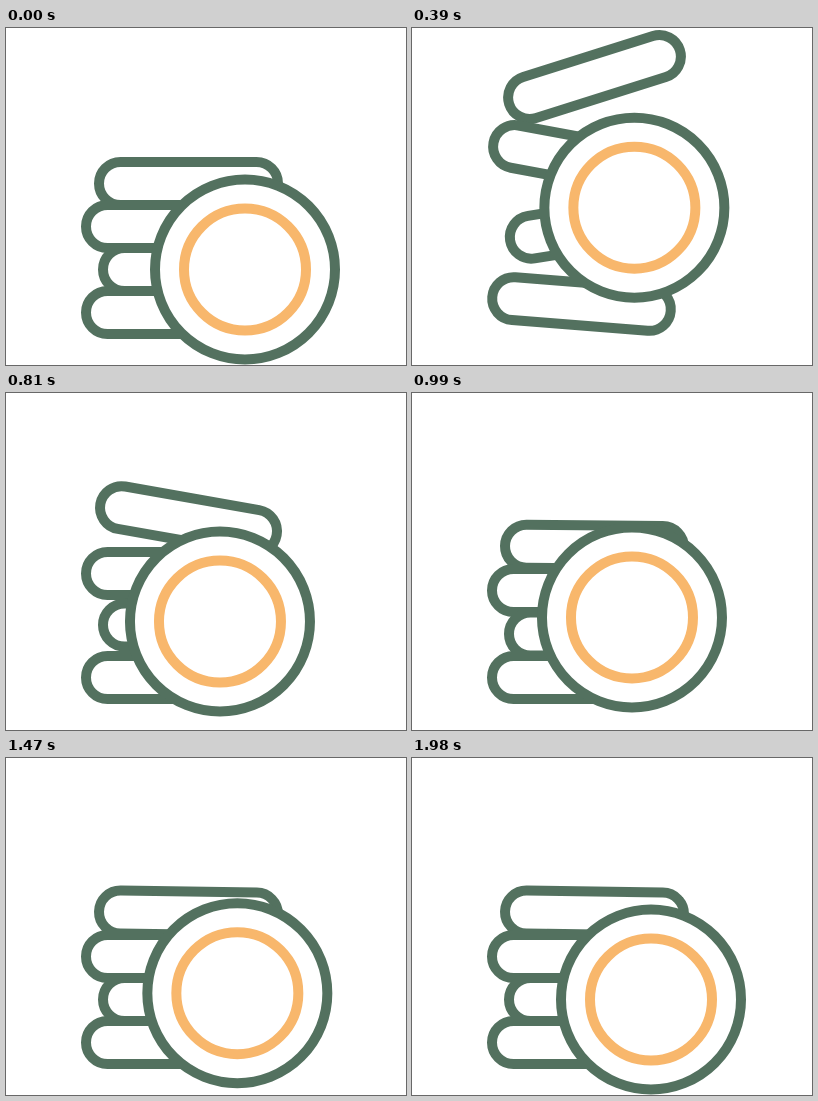
An HTML page that plays this animation: 400 by 337 pixels, repeating every 4.04 s.

```html
<!DOCTYPE html>
<html lang="en">
<head>
<meta charset="utf-8">
<title>Bouncing coin</title>
<style>
  html, body { margin: 0; width: 100%; height: 100%; overflow: hidden; background: #fff; }
  svg { display: block; width: 100%; height: 100%; }
  rect, circle { fill: none; stroke: #53715f; stroke-width: 10; }
  #coin circle:first-child { fill: #fff; }
  #coin circle:last-child { stroke: #f8b76c; }
</style>
</head>
<body>
<svg viewBox="0 0 400 337">
  <g id="bars"></g>
  <g id="coin"><circle r="90"/><circle r="61"/></g>
</svg>
<script>
const LOOP = 4040, STEP = 30, MOTION_END = 1980;

// Each bar jumps three times; a pose is [lift, angle].
const BAR_TIMES = [120, 390, 600, 810, 1020, 1212, 1430];
const REST = [0, 0];
const BARS = [
  { x: 182.5, y: 155.5, jumps: [[106.5, -17.5], [29, 10], [17.6, 6.1]], end: [0.5, 0.9] },
  { x: 169.5, y: 198.5, jumps: [[67.5, 10.5], [18, 0], [9.7, 0]], end: REST },
  { x: 186.5, y: 241.5, jumps: [[43, -9], [9.5, 0], [5, 0]], end: REST },
  { x: 169.5, y: 284.5, jumps: [[8.5, 4.5], REST, REST], end: REST }
];

// Coin hops: start and end time, x range, hop height, floor.
const HOPS = [
  { from: 0, to: 703, x: [239, 210.4], height: 62, y: [241.5, 240.5], ease: smooth },
  { from: 703, to: 1170, x: [210.4, 226], height: 17, y: [240.5, 240.5] },
  { from: 1170, to: 1620, x: [226, 234], height: 6, y: [240.5, 240.5] },
  { from: 1620, to: 1980, x: [234, 239], height: 0, y: [240.5, 241.5] }
];

function smooth(u) { return u * u * (3 - 2 * u); }
function mix(a, b, u) { return a + (b - a) * u; }

const coin = document.getElementById('coin');
for (const bar of BARS) {
  const [a, b, c] = bar.jumps;
  bar.poses = [REST, a, REST, b, REST, c, bar.end];
  bar.node = document.createElementNS(coin.namespaceURI, 'rect');
  const box = { x: -89.5, y: -21.5, width: 179, height: 43, rx: 21.5 };
  for (const name in box) bar.node.setAttribute(name, box[name]);
  document.getElementById('bars').append(bar.node);
}

function barPose(poses, t) {
  if (t <= BAR_TIMES[0]) return poses[0];
  const next = BAR_TIMES.findIndex(time => t < time);
  if (next < 0) return poses[poses.length - 1];
  const start = BAR_TIMES[next - 1];
  const u = smooth((t - start) / (BAR_TIMES[next] - start));
  return poses[next].map((value, i) => mix(poses[next - 1][i], value, u));
}

function draw(t) {
  for (const { x, y, poses, node } of BARS) {
    const [lift, angle] = barPose(poses, t);
    node.setAttribute('transform', `translate(${x} ${y - lift}) rotate(${angle})`);
  }
  const hop = HOPS.find(h => t <= h.to);
  const u = (t - hop.from) / (hop.to - hop.from);
  const x = mix(...hop.x, hop.ease ? hop.ease(u) : u);
  const y = mix(...hop.y, u) - hop.height * 4 * u * (1 - u);
  coin.setAttribute('transform', `translate(${x} ${y})`);
}

const begin = performance.now();
function tick() {
  const t = (performance.now() - begin) % LOOP;
  draw(Math.min(Math.floor(t / STEP) * STEP, MOTION_END));
  requestAnimationFrame(tick);
}
tick();
</script>
</body>
</html>
```
